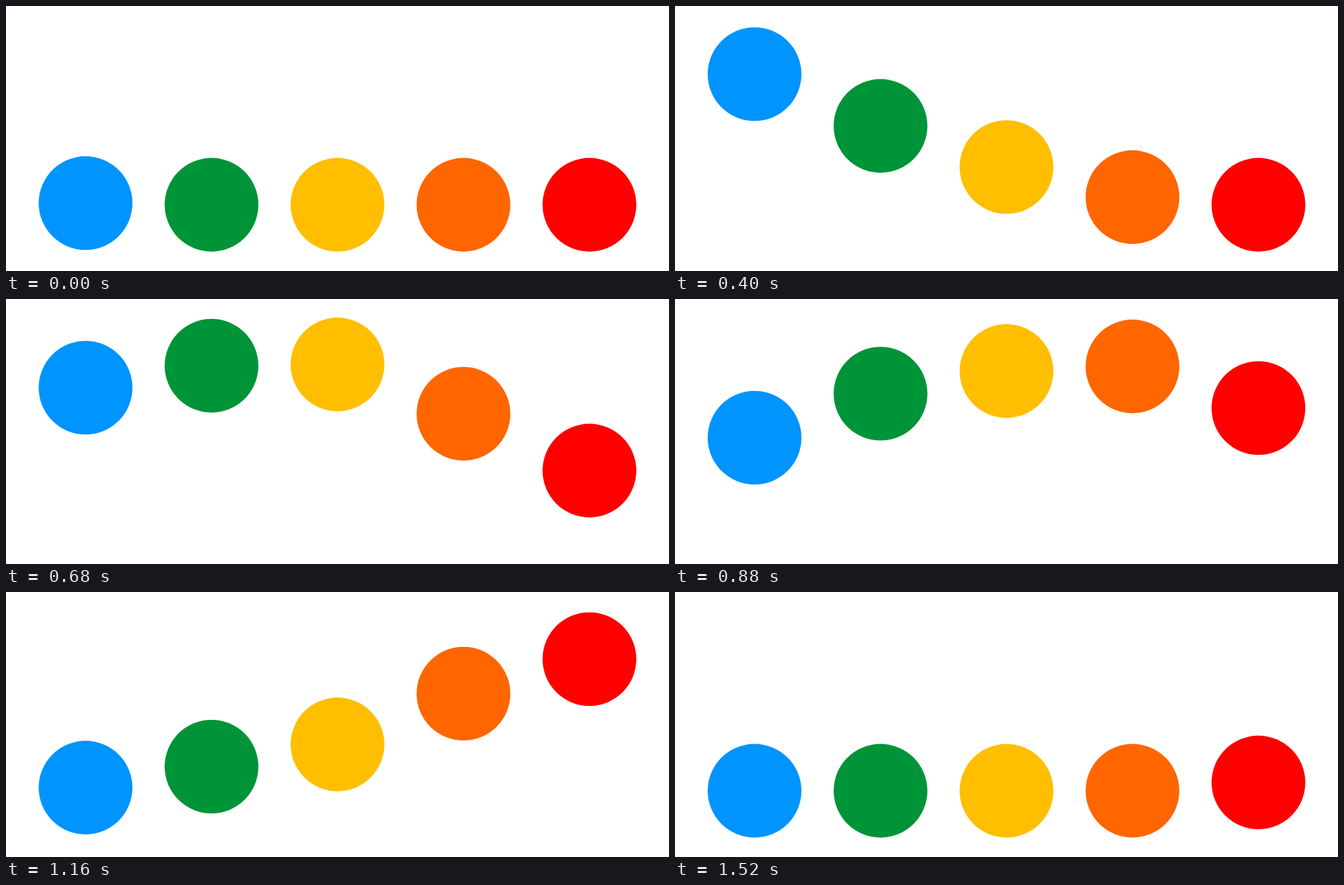
Write an HTML page that moves like this. It is 1000 by 400 pixels and loops after 1560 ms.

```html
<!DOCTYPE html>
<html lang="en">
<head>
<meta charset="utf-8">
<title>Bouncing dots</title>
<style>
  html, body { margin: 0; width: 100%; height: 100%; overflow: hidden; background: #fff; }
  svg { display: block; width: 100%; height: 100%; }
</style>
</head>
<body>
<svg id="stage" viewBox="0 0 1000 400"></svg>
<script>
const LOOP = 1560, STEP = 40, FLOOR = 300;

// times: start, peak, landing (ms); up and down: x of the two ease handles
const dots = [
  { color: '#0094ff', top: 100, times: [-40, 440, 1240], up: [.445, .59], down: [.44, .62] },
  { color: '#009438', top: 100, times: [55, 650, 1365], up: [.449, .616], down: [.412, .604] },
  { color: '#ffbf00', top: 90, times: [165, 765, 1440], up: [.49, .58], down: [.307, .619] },
  { color: '#ff6600', top: 95, times: [281, 964, 1475], up: [.44, .6], down: [.44, .6] },
  { color: '#ff0000', top: 100, times: [458, 1139, 1560], up: [.44, .6], down: [.34, .84] }
];

// cubic-bezier(a, 0, c, 1), solved by bisection
function ease(x, [a, c]) {
  if (x <= 0) return 0;
  if (x >= 1) return 1;
  let lo = 0, hi = 1, s;
  for (let i = 0; i < 24; i++) {
    s = (lo + hi) / 2;
    const bx = 3 * a * s * (1 - s) ** 2 + 3 * c * s * s * (1 - s) + s ** 3;
    if (bx < x) lo = s; else hi = s;
  }
  return s * s * (3 - 2 * s);
}

function height(t, { times: [start, peak, land], up, down }) {
  return t < peak
    ? ease((t - start) / (peak - start), up)
    : 1 - ease((t - peak) / (land - peak), down);
}

const stage = document.getElementById('stage');
dots.forEach((dot, i) => {
  dot.el = document.createElementNS('http://www.w3.org/2000/svg', 'circle');
  dot.el.setAttribute('cx', 120 + 190 * i);
  dot.el.setAttribute('r', 70.7);
  dot.el.setAttribute('fill', dot.color);
  stage.append(dot.el);
});

function draw(now) {
  const t = Math.floor((now % LOOP) / STEP) * STEP;
  for (const dot of dots) {
    dot.el.setAttribute('cy', FLOOR - (FLOOR - dot.top) * height(t, dot));
  }
}

let origin;
function tick(now) {
  origin ??= now;
  draw(now - origin);
  requestAnimationFrame(tick);
}
draw(0);
requestAnimationFrame(tick);
</script>
</body>
</html>
```
